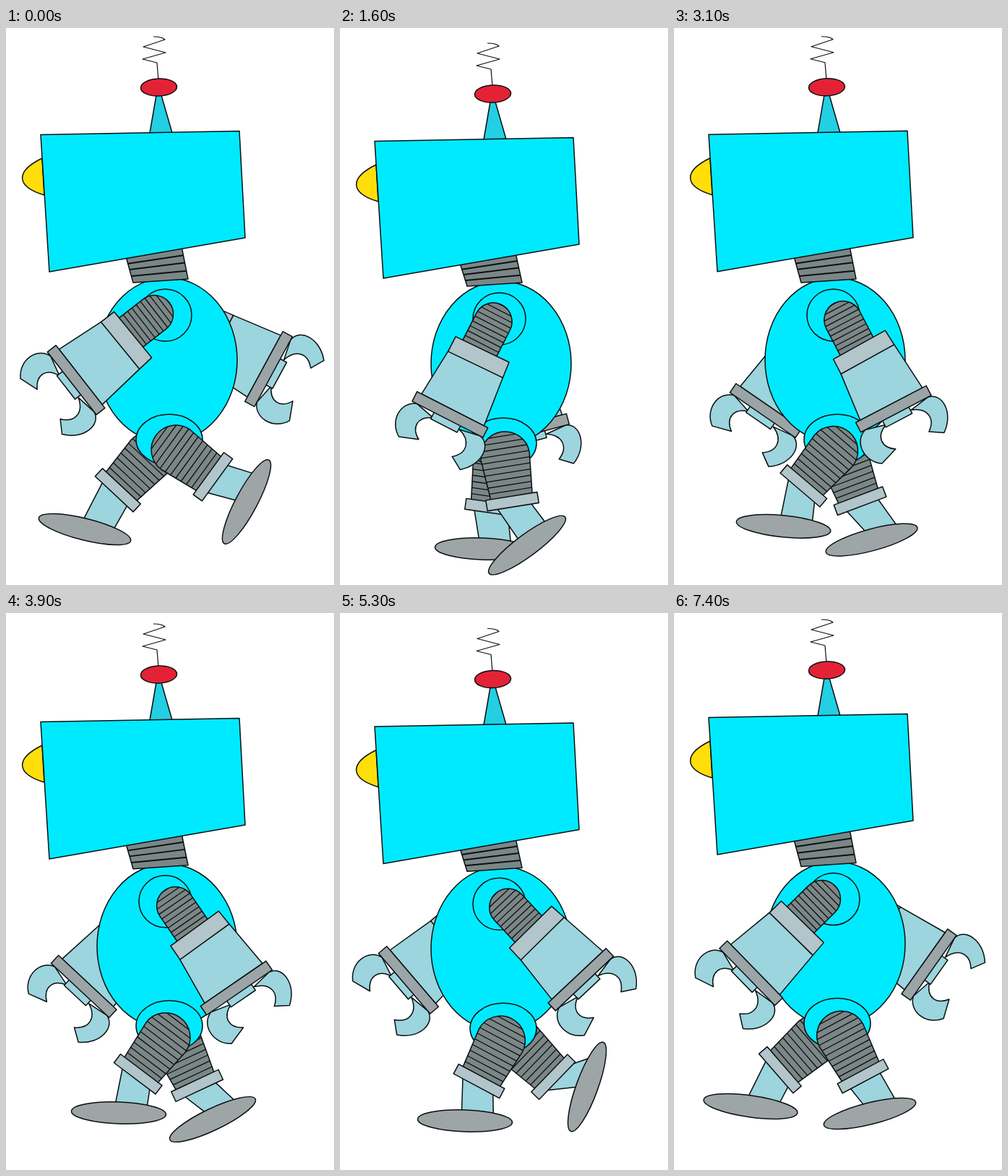
Recreate the animation shown at these times as an HTML page with a canvas. Size 454 by 770 pixels, loop 7.5 s.

```html
<!DOCTYPE html>
<html lang="en">
<head>
<meta charset="utf-8">
<title>Walking robot</title>
<style>
html, body { margin: 0; width: 100%; height: 100%; overflow: hidden; background: #fff; }
canvas { display: block; }
</style>
</head>
<body>
<canvas id="stage" width="454" height="770"></canvas>
<script>
const ctx = document.getElementById('stage').getContext('2d');
const LOOP = 7500, STEP = 100, RAD = Math.PI / 180;
const CYAN = '#00eaff', PALE = '#9cd5de', CUFF = '#b1c5ca', PLATE = '#9ba4a7', COIL = '#7b8787', FOOT = '#9ea5a7';

// Pose keys: angles in degrees (positive swings to the left), positions in pixels.
const times = [0, 800, 1600, 2400, 3200, 3900, 4800, 5300, 5900, 6300, 7400];
const bob = [0, 8.5, 9, 4.5, -0.5, 3, 8, 9.5, 6, 2, -3];
const nearArm = {
  angle: [52, 43, 27, 8, -31, -34.5, -41, -43.2, -27, -8.2, 45.7],
  x: [220, 221, 222, 230, 229, 228, 225, 224, 222, 222, 218]
};
const farArm = [-61.5, -45, -15, 10, 37, 43, 48, 49.4, 32, 10, -54.6];
const nearLeg = {
  angle: [-54, -35, -9, 29, 41, 37, 31, 28, 13, 2, -28],
  x: [333, 308, 259, 178, 150, 156, 167, 173, 192, 210, 271],
  y: [655, 677, 715, 701, 688, 691, 699, 702, 706, 710, 692],
  tilt: [-62, -56, -36.5, -2, 6, 2, 2, 2, 2, 2, -14]
};
const farLeg = {
  angle: [43, 27, 8, -17, -21, -25, -38, -46, -8, 27, 49],
  x: [109, 150, 197, 260, 275, 286, 320, 342, 262, 189, 106],
  y: [693, 709, 720, 711, 707, 700, 677, 655, 711, 714, 682],
  tilt: [14, 6, 2, -10, -16, -25.5, -52, -70, -45, -24, 8]
};

// Smooth curve through the keys at time t.
function at(keys, t) {
  const last = times.length - 1;
  let i = 0;
  while (i < last - 1 && t >= times[i + 1]) i++;
  const slope = k => {
    const a = Math.max(k - 1, 0), b = Math.min(k + 1, last);
    return (keys[b] - keys[a]) / (times[b] - times[a]);
  };
  const d = times[i + 1] - times[i], u = (t - times[i]) / d, v = 1 - u;
  return keys[i] * v * v * (1 + 2 * u) + keys[i + 1] * u * u * (3 - 2 * u)
    + d * u * v * (slope(i) * v - slope(i + 1) * u);
}

function paint(path, fill, width = 1.5) {
  if (fill) { ctx.fillStyle = fill; ctx.fill(path); }
  ctx.lineWidth = width;
  ctx.stroke(path);
}
const shape = (d, fill, width) => paint(new Path2D(d), fill, width);

function oval(x, y, rx, ry, fill, tilt = 0) {
  const p = new Path2D();
  p.ellipse(x, y, rx, ry, tilt * RAD, 0, 7);
  paint(p, fill);
}

function placed(x, y, angle, draw) {
  ctx.save();
  ctx.translate(x, y);
  ctx.rotate(angle * RAD);
  draw();
  ctx.restore();
}

function turn(x, y, angle, px, py) {
  const c = Math.cos(angle * RAD), s = Math.sin(angle * RAD);
  return [x + px * c - py * s, y + px * s + py * c];
}

// Ribbed tube with a round top.
function coil(x, y, r, half, bottom, gap) {
  const p = new Path2D();
  p.moveTo(x - half, bottom);
  p.lineTo(x - r, y);
  p.arc(x, y, r, Math.PI, 0);
  p.lineTo(x + half, bottom);
  p.closePath();
  paint(p, COIL);
  ctx.save();
  ctx.clip(p);
  let ribs = '';
  for (let k = bottom - gap; k > y - r; k -= gap) ribs += `M${x - r} ${k}h${2 * r}`;
  shape(ribs, null, 1.3);
  ctx.restore();
}

function arm(x, y, angle) {
  placed(x, y, angle, () => {
    coil(-3, 16, 26, 26, 58, 7.5);
    shape('M-40 80L44 79L51 150H-46Z', PALE);
    shape('M-40 58L42 56L44 79L-40 81Z', CUFF);
    shape('M52 165C72 168 74 200 49 219L31 208C48 195 44 177 23 170Z', PALE);
    shape('M-46 165C-67 172 -69 203 -47 217L-21 208C-38 197 -37 180 -17 172Z', PALE);
    shape('M-19 164H22V175H-19Z', PALE);
    shape('M-53 150H57V165H-53Z', PLATE);
  });
}

function leg(x, y, pose, t) {
  const [angle, fx, fy, tilt] = ['angle', 'x', 'y', 'tilt'].map(k => at(pose[k], t));
  const shin = [turn(x, y, angle, -24, 76), turn(x, y, angle, 23, 76),
    turn(fx, fy, tilt, 39, -10), turn(fx, fy, tilt, -5, -13)];
  shape('M' + shin.join('L') + 'Z', PALE);
  oval(fx, fy, 65.5, 15, FOOT, tilt);
  placed(x, y, angle, () => {
    coil(0, 10, 34, 29, 67, 8.5);
    shape('M-36 66H36V81H-36Z', CUFF);
  });
}

function neck(head, body) {
  const left = k => [166 + 10 * k, 316 + head + (37 + body - head) * k];
  const right = k => [243 + 9 * k, 302 + head + (46 + body - head) * k];
  shape(`M${left(0)}L${right(0)}L${right(1)}L${left(1)}Z`, COIL);
  for (const k of [0.27, 0.5, 0.75]) shape(`M${left(k)}L${right(k)}`, null, 2);
}

function head() {
  shape('M204 12Q216 12 220 16L190 26L221 34L189 43L209 48L211 72', null, 1.2);
  shape('M208 93H215L230 145H199Z', '#22cfe3');
  oval(211.5, 82, 25, 12, '#e42236', -2);
  shape('M50 180C13 198 13 219 53 231Z', '#ffde0a');
  shape('M48 147.5L323 142.5L331 290L60 337Z', CYAN);
}

function draw(t) {
  ctx.fillStyle = '#fff';
  ctx.fillRect(0, 0, 454, 770);
  ctx.strokeStyle = '#0b0f10';
  ctx.lineJoin = 'round';
  const lift = at(bob, t), body = 0.55 * lift - 0.9;
  const back = at(farArm, t);
  arm(218 - 0.1 * back, 399 + body, back);
  leg(223 - 0.42 * at(farLeg.angle, t), 586 + body, farLeg, t);
  oval(223, 460 + body, 97, 114, CYAN);
  oval(220.5, 398 + body, 36.5, 36, CYAN);
  oval(226, 570 + body, 46, 35, CYAN);
  neck(lift, body);
  leg(227, 578 + body, nearLeg, t);
  arm(at(nearArm.x, t), 389 + body, at(nearArm.angle, t));
  placed(0, lift, 0, head);
}

function tick() {
  draw(Math.floor(performance.now() % LOOP / STEP) * STEP);
  requestAnimationFrame(tick);
}
tick();
</script>
</body>
</html>
```
